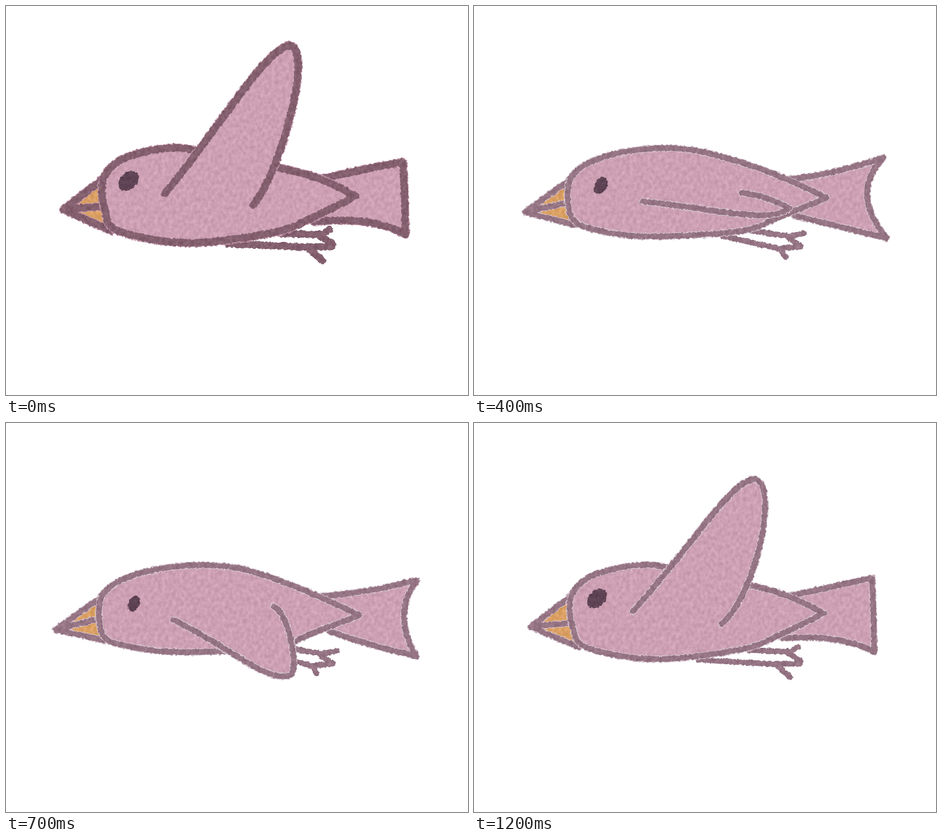
These frames come from a looping animation (815 px wide and 687 px high, 1.3 s). An HTML page:

```html
<!DOCTYPE html>
<html lang="en">
<head>
<meta charset="utf-8">
<title>Flying bird</title>
<style>
  html, body { margin: 0; width: 100%; height: 100%; overflow: hidden; background: #fff; }
  svg { display: block; width: 100%; height: 100%; }
  path { fill: none; stroke-linecap: round; stroke-linejoin: round; }
</style>
</head>
<body>
<svg viewBox="0 0 815 687">
  <filter id="crayon" filterUnits="userSpaceOnUse" x="0" y="0" width="815" height="687" color-interpolation-filters="sRGB">
    <feTurbulence type="fractalNoise" baseFrequency=".2" numOctaves="2" seed="4" result="wobble"/>
    <feDisplacementMap in="SourceGraphic" in2="wobble" scale="5" xChannelSelector="R" yChannelSelector="G" result="rough"/>
    <feTurbulence type="fractalNoise" baseFrequency=".16 .13" numOctaves="4" seed="9"/>
    <feColorMatrix values="1 0 0 0 0  1 0 0 0 0  1 0 0 0 0  0 0 0 0 1" result="grain"/>
    <feComposite in="rough" in2="grain" operator="arithmetic" k2="1" k3=".16" k4="-.08"/>
    <feComposite in2="rough" operator="in"/>
  </filter>
  <g id="bird" filter="url(#crayon)"></g>
</svg>
<script>
const PINK = '#cda0b4', ORANGE = '#dba063', EYE = '#5e4354';
const STEP = 100, STEPS = 13, LOWEST = 3;

// Wing and tail pass through four keys: high, folding, level, low
const wingKeys = [
  'M280,333 C386,216 448,108 493,99 C540,100 500,300 437,355',
  'M280,338 C380,277 425,216 468,216 C530,220 543,362 441,369',
  'M297,345 C426,358 520,386 556,357 C535,345 500,332 472,330',
  'M293,350 C360,430 399,535 447,533 C500,530 500,340 472,318'
];
// upper corner, notch and lower corner
const tailKeys = [
  '702,274 705,330 706,404',
  '710,267 710,335 713,407',
  '722,268 662,330 728,410',
  '728,287 698,340 718,413'
];
// The rest only shifts between its two extremes
const bodyKeys = [
  '617,336 540,374 470,400 320,417 200,397 174,360 171,308 200,274 250,257 295,251 335,254 490,287 560,308 617,336',
  '625,340 540,371 470,396 300,402 215,393 172,380 163,330 175,297 230,268 325,252 420,256 490,280 550,306 625,340'
];
const beakKeys = [
  'M172,305 L100,360 L185,396 M105,359 L175,353',
  'M165,310 L85,366 L175,382 M90,365 L165,343'
];
const legKeys = [
  'M485,401 L558,404 L572,396 M554,407 L576,420 M396,418 L530,426 L575,425 M536,430 L558,449',
  'M480,393 L556,408 L587,404 M556,411 L575,425 M460,400 L543,430 L577,425 M543,430 L546,441'
];
const eyeKeys = ['217 310 20 14 -45', '227 321 14 9 -70'];

const NUMBER = /-?[\d.]+/g;

// Blend the numbers of neighbouring keys; positions beyond the ends extrapolate
function at(keys, pos) {
  const i = Math.max(0, Math.min(keys.length - 2, Math.floor(pos)));
  const next = keys[i + 1].match(NUMBER);
  let k = 0;
  return keys[i].replace(NUMBER, n => +n + (next[k++] - n) * (pos - i));
}

// Catmull-Rom curve through the points
function spline(text) {
  const pts = text.split(' ').map(p => p.split(',').map(Number));
  const point = i => pts[Math.max(0, Math.min(pts.length - 1, i))];
  const handle = (i, sign) => point(i).map((v, k) => v + sign * (point(i + 1)[k] - point(i - 1)[k]) / 6);
  let d = 'M' + pts[0];
  for (let i = 1; i < pts.length; i++) d += `C${handle(i - 1, 1)} ${handle(i, -1)} ${pts[i]}`;
  return d;
}

function tailPath(flap) {
  const [top, notch, bottom] = at(tailKeys, flap).split(' ');
  return `M555,306 Q635,${288 + 5 * flap} ${top} Q${notch} ${bottom}`
    + ` Q645,${372 + 9 * flap} ${545 + 10 * flap},${380 - 5 * flap}`;
}

// flap runs from below 0 (wing fully raised) to LOWEST
function draw(flap) {
  const raised = flap < 0;
  const width = raised ? 13 : 10;
  const ink = raised ? '#84606f' : '#957484';
  const rim = raised ? PINK : '#d9c8d1';
  const shift = flap / LOWEST;
  const line = (d, color, w) => `<path d="${d}" stroke="${color}" stroke-width="${w}"/>`;
  const shape = (d, fill) => `<path d="${d}" style="fill:${fill}"/>`
    + line(d, rim, width + 2.5) + line(d, ink, width);
  const [cx, cy, rx, ry, angle] = at(eyeKeys, shift).split(' ');
  return shape(tailPath(flap), PINK)
    + line(at(legKeys, shift), ink, width)
    + shape(at(beakKeys, shift), ORANGE)
    + shape(spline(at(bodyKeys, shift)), PINK)
    + `<ellipse cx="${cx}" cy="${cy}" rx="${rx}" ry="${ry}" fill="${EYE}" transform="rotate(${angle} ${cx} ${cy})"/>`
    + shape(at(wingKeys, flap), PINK);
}

// Half a key per step, down and back up; the beat opens with an extra stretch
const flapAt = step => step === 0 ? -0.25 : LOWEST - Math.abs(step - 6) / 2;

const bird = document.getElementById('bird');
const start = performance.now();
let shown = -1;

function tick() {
  const step = Math.floor((performance.now() - start) / STEP) % STEPS;
  if (step !== shown) bird.innerHTML = draw(flapAt(shown = step));
  requestAnimationFrame(tick);
}
tick();
</script>
</body>
</html>
```
